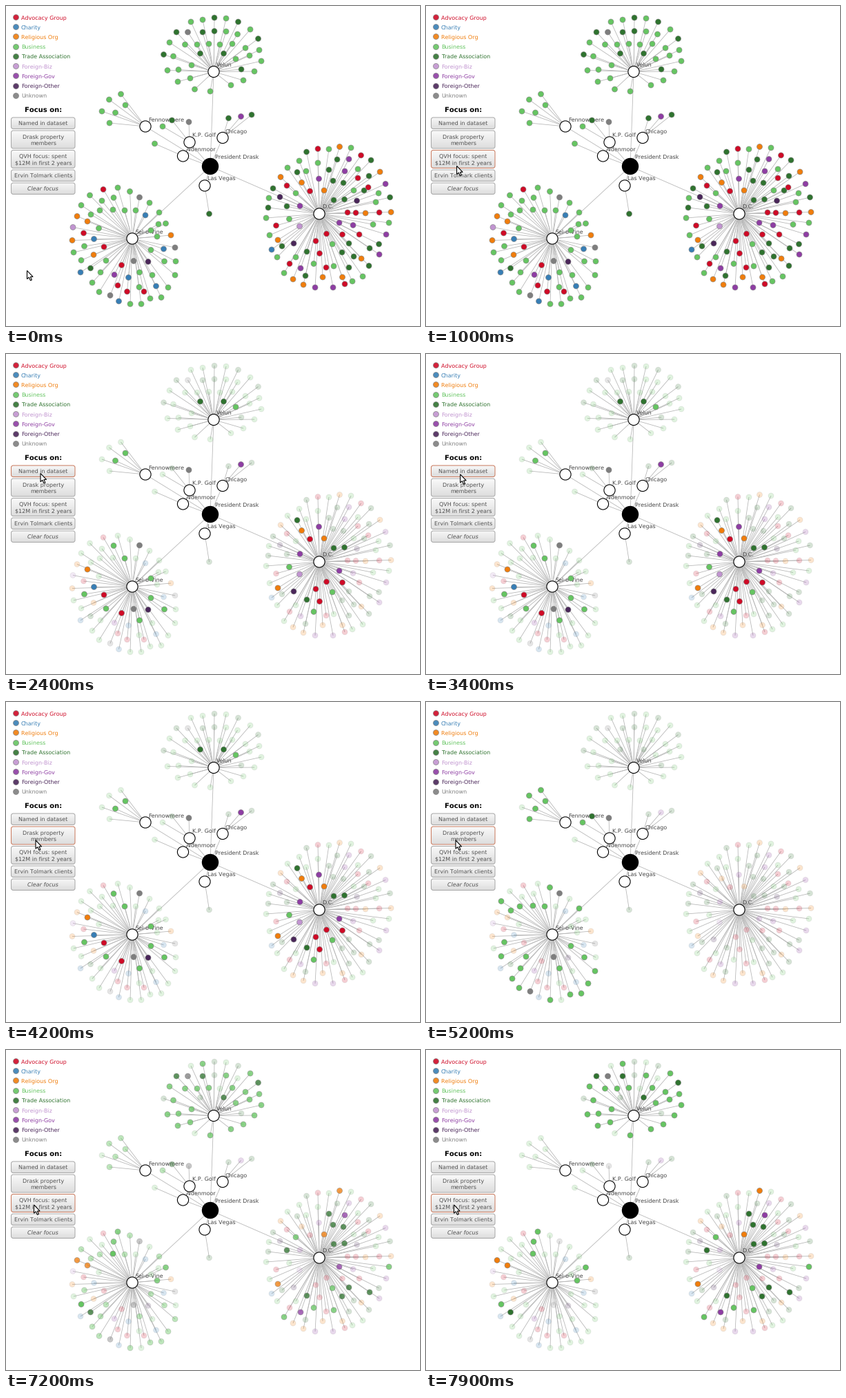
Recreate the animation shown at these times as a matplotlib script. Size 600x465 px, loop 8 s.

```python
import matplotlib.pyplot as plt
import numpy as np
from matplotlib.animation import FuncAnimation
from matplotlib.collections import LineCollection
from matplotlib.colors import to_rgb
from matplotlib.patches import Circle, FancyBboxPatch, Polygon

W, H, DPI = 600, 465, 100
FRAMES, STEP = 80, 100
PT = 72 / DPI
FADED = 0.2

plt.rcParams.update({"font.family": "DejaVu Sans", "text.hinting": "none",
                     "text.hinting_factor": 1, "text.parse_math": False})

KINDS = {
    "A": ("Advocacy Group", "#cf0a26"),
    "C": ("Charity", "#377eb5"),
    "R": ("Religious Org", "#f07d0c"),
    "B": ("Business", "#66c562"),
    "T": ("Trade Association", "#2f732f"),
    "FB": ("Foreign-Biz", "#c194d0"),
    "FG": ("Foreign-Gov", "#8e3da3"),
    "FO": ("Foreign-Other", "#4a2659"),
    "U": ("Unknown", "#7e7e7e"),
}

# name: hub centre, label baseline start
HUBS = {
    "Velun": ((301, 95.5), (305, 88)),
    "Fennowmere": ((202, 175), (206, 168)),
    "K.P. Golf": ((266, 198), (270, 190)),
    "Chicago": ((314, 191.5), (318, 184.5)),
    "Aldenmoor": ((256.5, 218), (260.5, 211)),
    "Las Vegas": ((288, 261), (292, 253.5)),
    "Sel-o-Vine": ((183, 338), (187, 331)),
    "D.C.": ((454, 302), (458, 294.5)),
}
ROOT = (296, 233)

fig = plt.figure(figsize=(W / DPI, H / DPI), dpi=DPI, facecolor="white")
ax = fig.add_axes([0, 0, 1, 1])
ax.axis("off")

pos, hues, focus, links = [], [], [], []


def leaves(hub, kind, marks, points):
    """Add leaf nodes; marks: n named, p property member, s big spender."""
    for p in points:
        pos.append(p)
        hues.append(to_rgb(KINDS[kind][1]))
        focus.append([1] + [m in marks for m in "nps"])
        links.append((HUBS[hub][0], p))


def label(x, y, s, size=8, color="#444444", **kw):
    return ax.text(x, y, s, fontsize=size * PT, color=color, **kw)


hub = "Velun"
leaves(hub, "B", "s", [
    (285, 20), (354, 34), (319, 37), (367, 64), (347, 61), (370, 80), (360, 95),
    (344, 108), (326, 115), (296, 124), (249, 110), (267, 105), (234, 93.5),
    (250, 92.5), (269, 86), (237, 53), (242.5, 73), (259.5, 56), (277, 56),
    (294, 55), (328, 55), (353, 72)])
leaves(hub, "B", "ns", [(333, 77)])
leaves(hub, "B", "", [(268, 23), (319, 18), (335.5, 41), (273.5, 121), (310, 56)])
leaves(hub, "T", "s", [(365.5, 47.5), (247, 38), (285, 38)])
leaves(hub, "T", "ns", [(315.5, 69)])
leaves(hub, "T", "n", [(281.5, 69)])
leaves(hub, "T", "", [(302, 17), (336.5, 23), (302, 36.5), (228.5, 70.5), (341, 92)])
leaves(hub, "U", "s", [(263.5, 38)])

hub = "Fennowmere"
leaves(hub, "B", "p", [(166.5, 128), (149.5, 136), (150, 170)])
leaves(hub, "B", "np", [(173, 144), (158.5, 155)])
leaves(hub, "B", "", [(139, 153)])

leaves("K.P. Golf", "T", "p", [(240.5, 166)])
leaves("K.P. Golf", "B", "p", [(227, 175)])
leaves("K.P. Golf", "U", "np", [(265, 168.5)])
leaves("Aldenmoor", "B", "", [(215.5, 200)])
leaves("Chicago", "T", "", [(322.5, 163), (356, 158)])
leaves("Chicago", "FG", "n", [(340.5, 160.5)])
leaves("Las Vegas", "T", "", [(294.5, 302)])

hub = "Sel-o-Vine"
leaves(hub, "B", "p", [
    (109, 289.5), (179.5, 269.5), (123, 303), (136, 297), (222, 300), (137, 387),
    (125, 402), (135, 415.5), (180, 433), (209, 425), (225, 423.5), (235, 409),
    (245, 391)])
leaves(hub, "B", "np", [(172, 297), (113.5, 349), (210, 354.5), (229.5, 371),
                        (193.5, 387), (145, 370)])
leaves(hub, "B", "ps", [(155, 296), (109, 369.5)])
leaves(hub, "B", "ns", [(156, 278.5)])
leaves(hub, "B", "n", [(210, 326)])
leaves(hub, "B", "s", [(162, 264), (231.5, 316), (219, 335)])
leaves(hub, "B", "", [
    (121.5, 275), (139, 283), (208, 286), (188, 297), (221, 317), (134.5, 323),
    (98, 358), (246, 371), (212, 391), (193, 408.5), (196, 433)])
leaves(hub, "U", "np", [(193.5, 278), (185, 370.5)])
leaves(hub, "U", "p", [(151, 420.5)])
leaves(hub, "U", "", [(245, 351)])
leaves(hub, "R", "s", [(103, 305.5)])
leaves(hub, "R", "ns", [(118, 313)])
leaves(hub, "R", "", [(96, 340.5), (127, 361.5), (239, 333)])
leaves(hub, "A", "n", [(142, 350), (167.5, 376.5)])
leaves(hub, "A", "", [(141, 266.5), (112.5, 330), (162, 406), (175.5, 415), (200, 415)])
leaves(hub, "C", "n", [(127.5, 338.5)])
leaves(hub, "C", "", [(202, 304), (228.5, 353), (108, 387), (177.5, 394.5),
                      (163.5, 429), (217.5, 407)])
leaves(hub, "FB", "", [(97, 321.5)])
leaves(hub, "FG", "", [(157, 390.5)])
leaves(hub, "FO", "n", [(206, 371.5)])
leaves(hub, "T", "s", [(122.5, 381)])

hub = "D.C."
leaves(hub, "T", "n", [(422, 241.5)])
leaves(hub, "T", "ns", [(475, 282), (490.5, 281), (436, 357)])
leaves(hub, "T", "s", [(468, 238), (474, 254), (489, 257), (407, 291), (497, 345),
                       (527, 352), (487, 358)])
leaves(hub, "T", "", [
    (435.5, 212), (480, 223), (529, 224), (556.5, 278), (387, 265), (380, 293),
    (526, 247), (519, 268), (540.5, 346), (526, 377.5), (504, 364), (497, 380),
    (434, 392), (400, 349)])
leaves(hub, "B", "n", [(410.5, 309.5)])
leaves(hub, "B", "ns", [(473, 346), (446, 374.5)])
leaves(hub, "B", "s", [(420, 272), (555, 315), (403, 388), (475, 378)])
leaves(hub, "B", "", [
    (468, 208), (500, 206), (425, 225), (408, 235), (452, 228), (435, 240),
    (510, 237), (540, 272), (536, 285), (381, 279), (377, 308), (382, 333),
    (393, 365), (532, 317.5), (517, 393), (502, 400), (420, 365), (504, 268)])
leaves(hub, "A", "n", [(440.5, 269), (454.5, 359.5), (449, 341.5), (464.5, 331),
                       (487.5, 332)])
leaves(hub, "A", "", [
    (452, 207.5), (514.5, 217), (407, 261), (510, 250), (525, 263.5), (495, 300),
    (507, 300.5), (541, 300), (391.5, 319), (512, 332), (411, 374.5), (464, 380),
    (491, 404)])
leaves(hub, "R", "n", [(428.5, 256.5)])
leaves(hub, "R", "ns", [(461, 268), (394, 340)])
leaves(hub, "R", "s", [(483.5, 204.5)])
leaves(hub, "R", "", [(398, 248.5), (542, 241), (558, 299.5), (521, 301), (431, 405),
                      (416, 397), (459, 394), (487.5, 394), (515, 367)])
leaves(hub, "FG", "n", [(453.5, 251), (426, 290.5)])
leaves(hub, "FG", "ns", [(483, 315)])
leaves(hub, "FG", "s", [(491, 240), (427, 381)])
leaves(hub, "FG", "", [(497, 222.5), (550, 258.5), (503, 318.5), (551, 332),
                       (541, 361), (448, 409), (474, 409)])
leaves(hub, "FB", "n", [(425.5, 320)])
leaves(hub, "FO", "n", [(417, 345)])
leaves(hub, "FO", "", [(397, 277.5), (508.5, 283)])
leaves(hub, "C", "", [(385, 354)])

pos, hues, focus = np.array(pos), np.array(hues), np.array(focus, float)
levels = FADED + (1 - FADED) * focus
links += [(ROOT, c) for c, _ in HUBS.values()]

ax.add_collection(LineCollection(links, colors="#b6b6b6", linewidths=0.8 * PT, zorder=1))
for name, (centre, at) in HUBS.items():
    ax.add_patch(Circle(centre, 8.1, fc="white", ec="black", lw=1.1 * PT, zorder=2))
    label(*at, name, zorder=3)
ax.add_patch(Circle(ROOT, 12.2, fc="black", lw=0, zorder=2))
label(303, 221.5, "President Drask", zorder=3)

DOT = (2 * 4.0 * PT) ** 2
dots = ax.scatter(pos[:, 0], pos[:, 1], s=DOT, linewidths=0.7 * PT, zorder=4)

for i, (name, color) in enumerate(KINDS.values()):
    y = 16 + 14.25 * i
    ax.scatter([14], [y], s=DOT, color=color, alpha=0.9, edgecolors="#808080",
               linewidths=0.7 * PT)
    label(22, y + 2.9, name, color=color)

label(54, 154, "Focus on:", 9.6, "black", weight="bold", ha="center")


def button(top, bottom, *lines, **kw):
    box = FancyBboxPatch((7.5, top), 92.5, bottom - top, fc="none", ec="#a6a6a6",
                         boxstyle="round,pad=0,rounding_size=3", lw=PT, zorder=6)
    ax.add_patch(box)
    shade = ax.imshow(np.linspace(0.975, 0.865, 32)[:, None], cmap="gray", vmin=0,
                      vmax=1, extent=(7, 101, bottom, top), aspect="auto", zorder=5)
    shade.set_clip_path(box)
    mid = (top + bottom) / 2
    for i, s in enumerate(lines):
        y = mid + 9.8 * (i - (len(lines) - 1) / 2)
        label(53.8, y + 2.8, s, color="#505050", ha="center", zorder=7, **kw)
    return box, top, bottom


buttons = [
    button(162, 178.5, "Named in dataset"),
    button(181, 207, "Drask property", "members"),
    button(209.5, 235.5, "QVH focus: spent", "$12M in first 2 years"),
    button(238, 254.5, "Ervin Tolmark clients"),
    button(257, 273.5, "Clear focus", style="italic"),
]

ARROW = np.array([(0, 0), (0, 12.2), (2.8, 9.7), (4.9, 14.4), (6.9, 13.5),
                  (4.9, 9), (8.6, 9)])
cursor = Polygon(ARROW, fc="white", ec="black", lw=1.1 * PT, zorder=9)
ax.add_patch(cursor)

ax.set_xlim(0, W)
ax.set_ylim(H, 0)

CLICKS = (1600, 4450, 6850)
FADE = 600
# start, end, destination of the pointer
MOVES = [(500, 1350, (50, 173.5)), (3250, 3900, (43, 201)), (5600, 6150, (40.5, 225))]


def ease(t, start, end):
    u = np.clip((t - start) / (end - start), 0, 1)
    return 4 * u**3 if u < 0.5 else 1 - 4 * (1 - u) ** 3


def draw(i):
    t = i * STEP
    alpha = levels[:, 0]
    for k, click in enumerate(CLICKS, 1):
        alpha = alpha + (levels[:, k] - alpha) * ease(t, click, click + FADE)
    dots.set_facecolors(np.column_stack([hues, alpha]))
    rims = np.full_like(hues, 0.5)
    dots.set_edgecolors(np.column_stack([rims, alpha * 0.8]))

    tip = np.array([30.5, 384.5])
    for start, end, goal in MOVES:
        tip = tip + (np.array(goal) - tip) * ease(t, start, end)
    cursor.set_xy(ARROW + tip)
    for box, top, bottom in buttons:
        hot = top <= tip[1] <= bottom
        box.set_edgecolor("#c9795c" if hot else "#a6a6a6")
    return dots, cursor


anim = FuncAnimation(fig, draw, frames=FRAMES, interval=STEP, repeat=True,
                     repeat_delay=0, blit=False)
plt.show()
```
